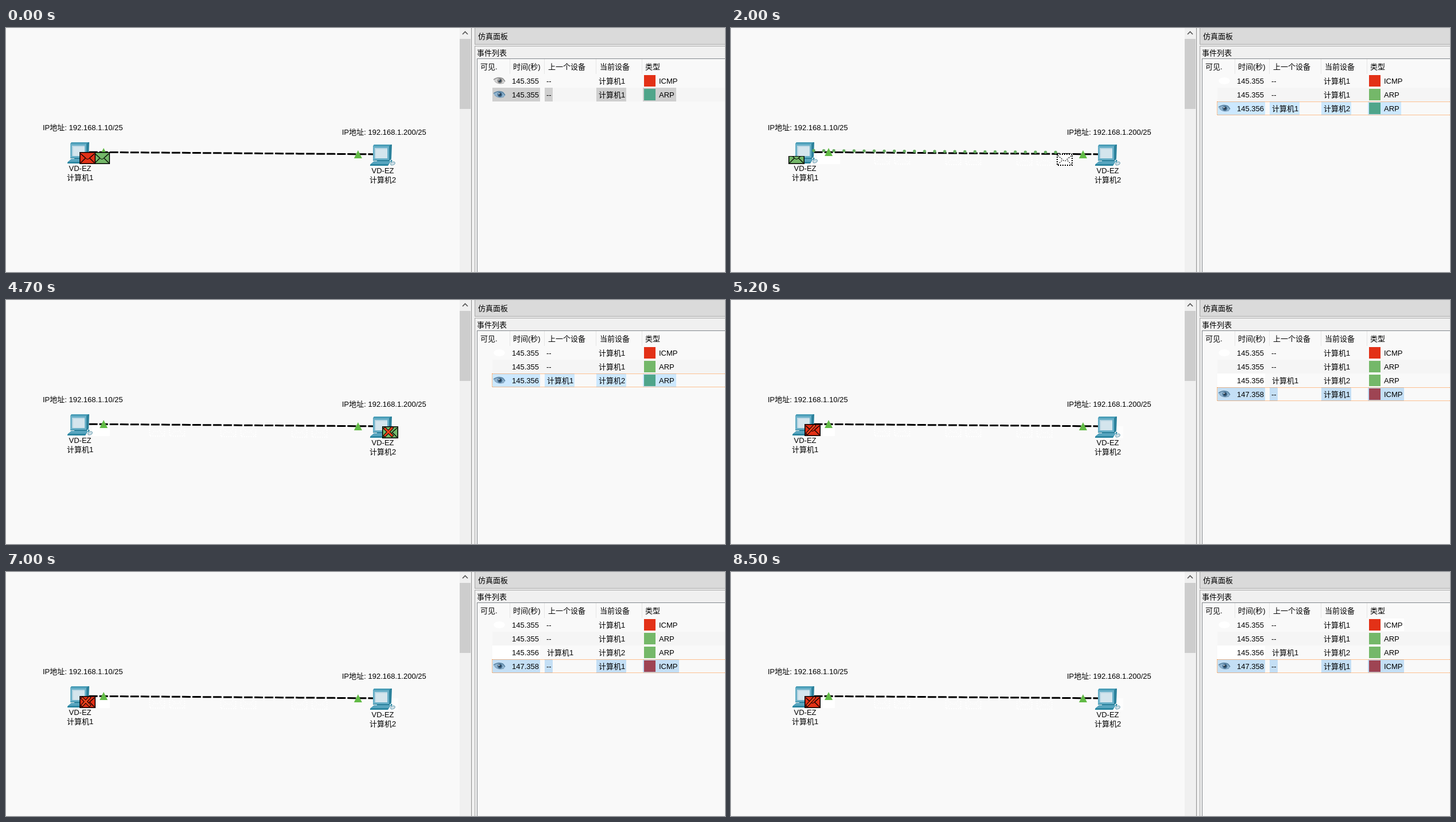
An HTML page for the animation above (9700 ms loop, 1252 by 425 pixels).

```html
<!DOCTYPE html>
<html lang="zh">
<head>
<meta charset="utf-8">
<style>
html, body { margin: 0; width: 100%; height: 100%; overflow: hidden; background: #f9f9f9; }
svg { display: block; }
text { font: 13px "Liberation Sans", "Noto Sans CJK SC", "Noto Sans CJK", sans-serif; fill: #000; white-space: pre; }
</style>
</head>
<body>
<svg id="stage" width="1252" height="425" viewBox="0 0 1252 425"></svg>
<script>
const LOOP = 9700, STEP = 100;
const RED = '#e33117', GREEN = '#74b869', TEAL = '#4fa58a', WINE = '#9e4453';
const stage = document.getElementById('stage');

const rect = (x, y, w, h, fill) => `<rect x="${x}" y="${y}" width="${w}" height="${h}" fill="${fill}"/>`;
const text = (x, y, s, anchor = 'start') => `<text x="${x}" y="${y}" text-anchor="${anchor}">${s}</text>`;
const path = (d, stroke, width = 1, more = '') =>
  `<path d="${d}" fill="none" stroke="${stroke}" stroke-width="${width}" ${more}/>`;
const shape = (d, fill) => `<path d="${d}" fill="${fill}"/>`;
const at = (x, y, body) => `<g transform="translate(${x} ${y})">${body}</g>`;
const range = (count, fn) => Array.from({ length: count }, (_, i) => fn(i)).join('');

const FLAP = 'M2 3L10 10Q14 15 18 10L26 3M2 19L10 11M26 19L18 11';
const envelope = (x, y, fill) => at(x, y,
  rect(0, 0, 28, 21, '#000') + rect(1.5, 1.5, 25, 18, fill) + path(FLAP, '#000', 1.2));
const sketch = (x, y, ink, width) => at(x, y,
  path('M1 1H27V20H1Z', ink, width, 'stroke-dasharray="2 2"') + path(FLAP, ink, 1.2, 'stroke-dasharray="2 2"'));

// The cross is drawn one stroke after the other, in four poses.
function cross(x, y, pose) {
  const d = ['M5 16L17 3M5 4L17 16', 'M5 16L11 9.5', 'M5 16L17 3', 'M5 16L17 3M5 4L11 10'][pose];
  return at(x, y, path(d, '#000', 5, 'stroke-linecap="square"') +
    path(d, '#f2441c', 3, 'stroke-linecap="square"'));
}

const computer = (x, y, name) => at(x, y,
  shape('M7 0H38L37 25 34 28V30H12V28H5V3Z', '#2b819b') +
  shape('M7 0H36L33 3H5Z', '#4a9db7') + shape('M5 3H33V27H5Z', '#69b0c8') +
  rect(8, 6, 22, 18, '#d4e5ed') + shape('M8 6H30V8H10V24H8Z', '#b9d6e3') +
  shape('M7 29H36L31 37H0V35Z', '#2b86a1') + shape('M7 29H36L32 34H1Z', '#58a5bf') +
  shape('M36 26L39 28 36 32Z', '#2b86a1') +
  '<ellipse cx="39.5" cy="33" rx="4" ry="2.6" fill="#cfe0e8" stroke="#6d9fb1" transform="rotate(-25 39.5 33)"/>') +
  text(x + 22, y + 50, 'VD-EZ', 'middle') + text(x + 22, y + 66, name, 'middle');

const eye = (y, blue) => at(848, y - 7,
  shape('M1 6Q8 0 16 2Q21 4 21 9Q17 13 10 12Q5 11 1 6Z', blue ? '#8fb3cf' : '#d2d2d2') +
  path('M1 5Q9 -1 17 3L21 8', blue ? '#56809f' : '#8b8b8b', 1.5) +
  path('M3 8Q9 14 19 11', blue ? '#7799b3' : '#aaa') +
  `<circle cx="12" cy="7" r="4.2" fill="${blue ? '#41688a' : '#777'}"/>` +
  '<circle cx="12" cy="7" r="2" fill="#243848"/><circle cx="10.5" cy="5.5" r="1.1" fill="#fff"/>');

const triangle = (x, y) => shape(`M${x} ${y}l7 14h-14Z`, '#62bb46');

function row(i, time, prev, cur, type, swatch, tint) {
  const y = 80 + i * 24;
  let s = '';
  if (tint) {
    const cells = [[847, 83], [938, prev == '--' ? 14 : 52], [1028, 52], [1109, type == 'ARP' ? 58 : 63]];
    s = cells.map(([x, w]) => rect(x, y, w, 24, tint)).join('') + eye(y + 12, true);
  }
  return s + rect(1111, y + 2, 20, 20, swatch) + text(881, y + 17, time) +
    text(prev == '--' ? 941 : 942, y + 17, prev) + text(1032, y + 17, cur) + text(1137, y + 17, type);
}
const focus = y => path(`M847 ${y + .5}H1252M847 ${y + 23.5}H1252M846.5 ${y}v24`, '#ff8728', 1, 'stroke-dasharray="1 1"');

function list(n) {
  const first = n < 0, last = n >= 41;
  let s = rect(first ? 952 : 847, 104, 405, 24, '#f5f5f5');
  s += first ? eye(92, false) : '<ellipse cx="859" cy="92" rx="10" ry="6" fill="#fff"/>';
  if (n >= 73) s += rect(1133, 81, 39, 22, '#fff');
  s += row(0, '145.355', '--', '计算机1', 'ICMP', RED);
  s += row(1, '145.355', '--', '计算机1', 'ARP', first ? TEAL : GREEN, first && '#cfcfcf');
  if (!first) {
    if (last) s += rect(847, 128, 83, 24, '#fff');
    s += row(2, '145.356', '计算机1', '计算机2', 'ARP', last ? GREEN : TEAL, !last && '#cce8ff');
  }
  if (last) s += row(3, '147.358', '--', '计算机1', 'ICMP', WINE, '#c4dff5');
  return s + (first ? '' : focus(last ? 152 : 128));
}

const frame =
  rect(790, 0, 20, 425, '#f0f0f0') + rect(790, 19, 19, 122, '#cdcdcd') +
  path('M795 11L799.5 6.5 804 11', '#555', 1.7) +
  rect(811, 0, 441, 425, '#f0f0f0') + rect(810, 0, 1, 425, '#8c8c8c') +
  rect(817, 0, 435, 28, '#dadada') + rect(816, 0, 1, 29, '#a6a6a6') + rect(816, 28, 436, 1, '#a6a6a6') +
  rect(816, 31, 436, 1, '#a6a6a6') + rect(816, 31, 1, 394, '#a6a6a6') +
  rect(820, 53, 432, 372, '#82878c') + rect(821, 54, 431, 371, '#f9f9f9') +
  [877, 937, 1027, 1107].map(x => rect(x, 54, 1, 26, '#e5e5e5')).join('') +
  text(822, 19, '仿真面板') + text(820, 48, '事件列表') +
  text(826, 72, '可见.') + text(883, 72, '时间(秒)') + text(944, 72, '上一个设备') +
  text(1034, 72, '当前设备') + text(1113, 72, '类型');

const scene =
  path('M128 216L655 220', '#000', 3, 'stroke-dasharray="12 6" stroke-linecap="square"') +
  triangle(170, 209) + triangle(613, 213) +
  computer(107, 199, '计算机1') + computer(634, 203, '计算机2') +
  text(64, 178, 'IP地址: 192.168.1.10/25') + text(585, 186, 'IP地址: 192.168.1.200/25');

// Two short strides, then a long one.
const flightX = n => 160 + 35 * n + 19 * Math.floor((n + 1) / 3);
const flightY = x => Math.round(216 + (x - 153) * .008);

function traces(n) {
  if (n < 0) return '';
  let s = rect(150, 217, n < 12 ? 40 : 31, 20, '#fff');
  for (let i = 2; i < Math.min(n, 10); i++)
    if (i % 3 != 1) s += sketch(flightX(i), flightY(flightX(i)), '#fff', 1.6);
  return s + (n >= 41 ? rect(655, 220, 28, 21, '#fdfdfd') : '');
}

function trail(n) {
  if (n < 0) return '';
  const tail = Math.floor(17 + (n - 19) * 2.2);
  return range(30, i => {
    const x = 144 + i * 17.55;
    return i < tail || x > flightX(n) ? '' :
      `<circle cx="${x}" cy="${213.5 + (x - 144) * .007}" r="2.7" fill="#63ad5e"/>`;
  });
}

function packets(n) {
  if (n < 0) return envelope(153, 216, GREEN) + envelope(128, 216, RED);
  let s = '';
  if (n < 11)
    s += '<svg x="100" y="223" width="28" height="14">' + envelope(0, -7, GREEN) + rect(0, 0, 28, 1, '#000') + '</svg>';
  if (n < 12) {
    const x = flightX(n), y = flightY(x);
    return s + rect(x, y, 28, 21, '#fff') + sketch(x, y, '#000', 2);
  }
  if (n < 41)
    return envelope(655, 220, GREEN) + (n < 26 ? '' : cross(655, 220, (n - 37) & 3));
  return envelope(128, 216, RED) + cross(128, 216, (Math.min(n, 66) - 40) & 3);
}

let shown;
function draw(now) {
  const n = Math.floor(now % LOOP / STEP) - 10;
  if (n !== shown) {
    shown = n;
    stage.innerHTML = rect(0, 0, 1252, 425, '#f9f9f9') + frame + traces(n) + scene + trail(n) + packets(n) + list(n);
  }
  requestAnimationFrame(draw);
}
draw(performance.now());
</script>
</body>
</html>
```
